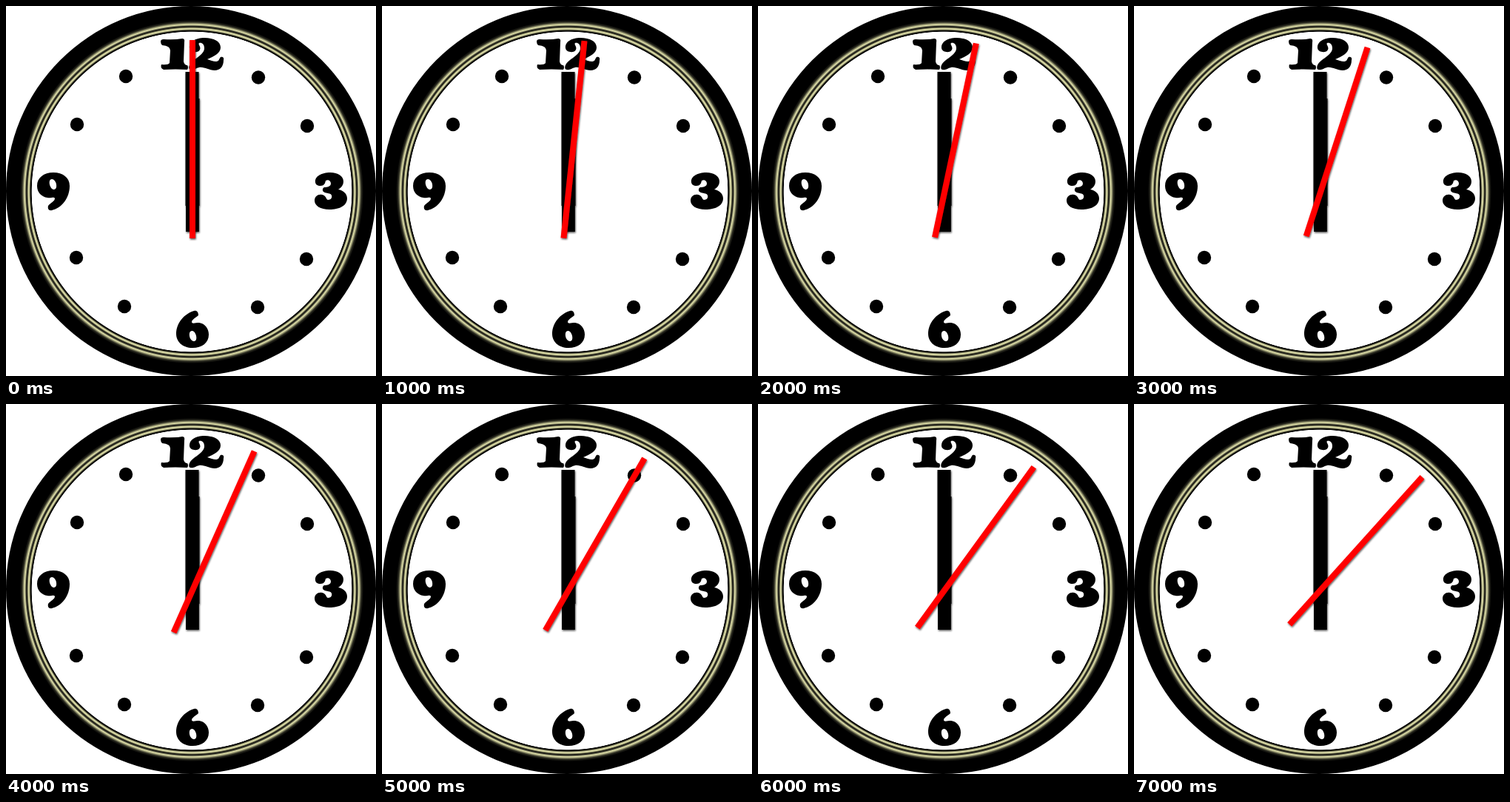
An HTML page for the animation above (8 s loop, 500 by 500 pixels).

```html
<!DOCTYPE html>
<html lang="en">
<head>
<meta charset="utf-8">
<title>Clock</title>
<style>
html, body { margin: 0; width: 100%; height: 100%; overflow: hidden; background: #fff; }
svg { display: block; width: 100vw; height: 100vh; }
</style>
</head>
<body>
<svg viewBox="0 0 500 500" role="img" aria-label="Clock with the numerals 12, 3, 6 and 9">
  <defs>
    <radialGradient id="rim" gradientUnits="userSpaceOnUse" cx="251" cy="251" r="232">
      <stop offset=".931" stop-color="#fff"/>
      <stop offset=".934" stop-color="#000"/>
      <stop offset=".939" stop-color="#12120c"/>
      <stop offset=".948" stop-color="#e6e6ae"/>
      <stop offset=".953" stop-color="#c4c492"/>
      <stop offset=".960" stop-color="#15150f"/>
      <stop offset=".965" stop-color="#34342a"/>
      <stop offset=".973" stop-color="#e6e6ae"/>
      <stop offset=".979" stop-color="#a0a078"/>
      <stop offset=".988" stop-color="#2a2a20"/>
      <stop offset="1" stop-color="#000"/>
    </radialGradient>
    <filter id="shadow" filterUnits="userSpaceOnUse" x="0" y="0" width="500" height="500">
      <feDropShadow dx=".8" dy="1.6" stdDeviation="1" flood-color="#000" flood-opacity=".65"/>
    </filter>
  </defs>

  <circle cx="250" cy="250" r="250"/>
  <circle cx="251" cy="251" r="232" fill="url(#rim)"/>
  <g id="dots"></g>

  <g fill-rule="evenodd">
    <path d="M209 48Q209 45 213 45Q228 46 238 44Q242 44 241 49L240 75Q241 80 245 80Q247 83 245 86Q229 85 213 86Q208 84 210 79Q219 80 221 77L222 60Q222 54 211 53Q209 51 209 48Z"/>
    <path d="M248 57C247 48 257 43 268 43C281 43 290 48 290 56C290 64 281 68 272 72C276 73 280 75 284 75C288 75 288 71 290 69C293 68 295 70 294 73C294 82 289 87 282 87C274 87 268 82 261 83C256 84 254 87 250 86C246 86 247 81 249 78C254 71 268 66 268 57C268 51 264 49 261 50C259 52 264 55 262 59C260 64 249 63 248 57Z"/>
    <path d="M418 238C417 230 427 225 438 225C449 225 456 230 456 237C456 243 452 246 449 248C456 249 461 254 461 260C461 270 450 275 437 275C425 275 417 270 417 263C417 257 422 254 427 255C433 256 432 261 435 262C439 262 441 259 440 256C439 252 433 254 429 251C427 249 428 246 430 245C434 245 439 244 439 240C439 236 435 234 432 236C431 240 430 243 425 243C421 243 418 241 418 238Z"/>
    <path d="M252 462C239 462 230 454 230 443C230 428 241 416 254 412C258 411 260 414 260 418C255 422 251 424 251 427C251 430 256 428 261 428C269 429 274 436 274 444C274 455 265 462 252 462ZM254 453c4 0 4-6 2-10c-2-5-7-5-8-1c-1 5 2 11 6 11Z"/>
    <path d="M64 225C77 225 86 232 86 243C86 260 75 273 62 276C58 277 56 274 57 270C61 265 66 264 66 260C65 257 61 260 56 259C48 258 42 252 42 243C42 232 51 225 64 225ZM62 234c-4 0-4 6-2 10c2 5 7 5 8 1c1-5-2-11-6-11Z"/>
  </g>

  <g filter="url(#shadow)" fill="#050505">
    <path d="M242.5 89H260.5V125H261.5V270H260.8V305H243V270H242.5Z"/>
  </g>
  <g filter="url(#shadow)">
    <rect id="second" x="248" y="46" width="8" height="268" fill="#f00"/>
  </g>
</svg>
<script>
const STEP = 1000, LOOP = 8000;
const second = document.getElementById('second');
const dots = [
  [162, 95], [341, 96.5], [407, 162], [406, 342],
  [340, 407], [160, 406], [95, 340], [96, 160]
];
document.getElementById('dots').innerHTML =
  dots.map(([x, y]) => `<circle cx="${x}" cy="${y}" r="9.2"/>`).join('');

function draw(t) {
  const angle = Math.floor((t % LOOP) / STEP) * 6;
  second.setAttribute('transform', `rotate(${angle} 252 251.5)`);
}

let start;
function tick(now) {
  start ??= now;
  draw(now - start);
  requestAnimationFrame(tick);
}
draw(0);
requestAnimationFrame(tick);
</script>
</body>
</html>
```
